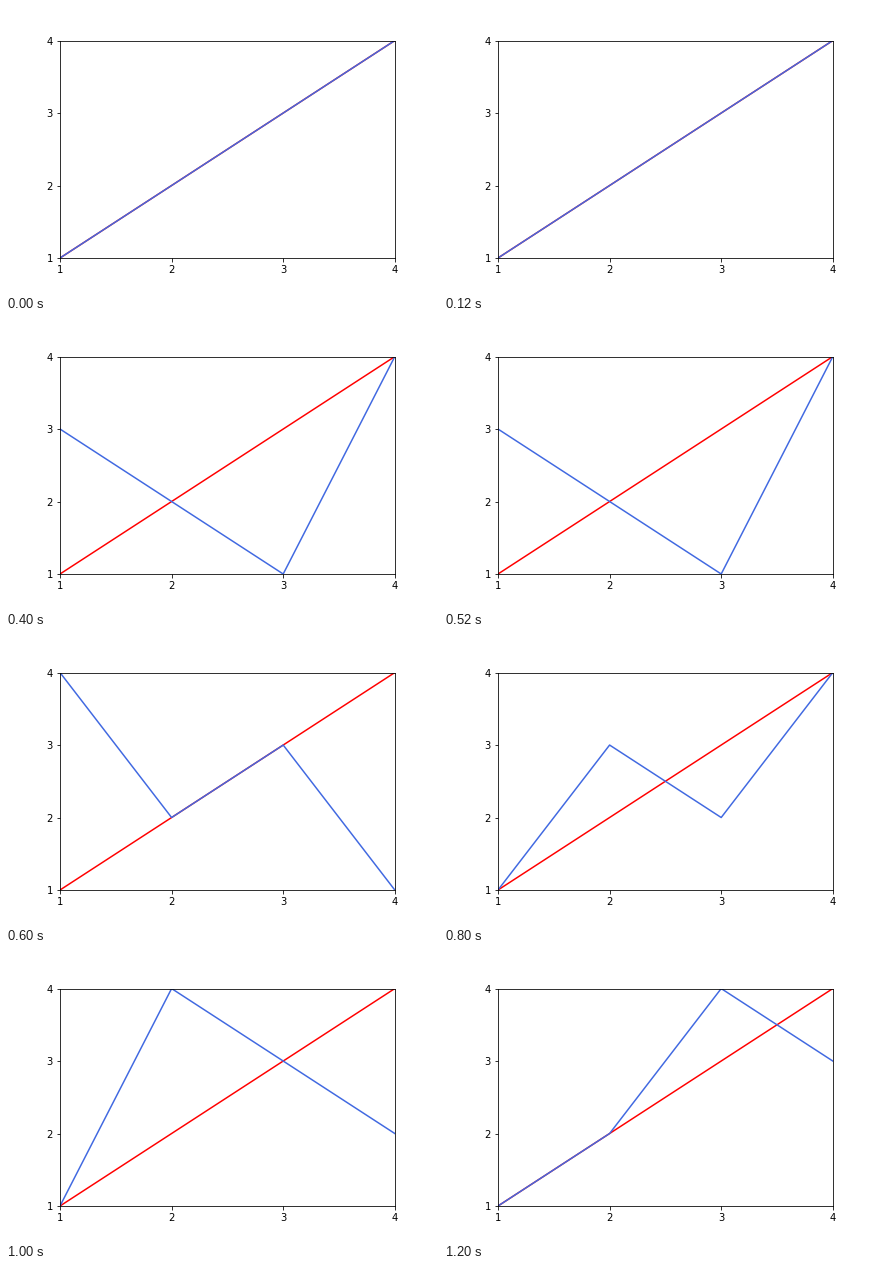
Animation, 432 px wide and 288 px high, one loop 1400 ms. Source, as a matplotlib script:

```python
from itertools import combinations

import matplotlib.pyplot as plt
from matplotlib.animation import FuncAnimation

VALUES = [1, 2, 3, 4]


def swapped(i, j):
    order = VALUES.copy()
    order[i], order[j] = order[j], order[i]
    return order


# The sorted order, followed by every exchange of two elements.
orders = [VALUES] + [swapped(i, j) for i, j in combinations(range(len(VALUES)), 2)]

plt.rcParams["font.family"] = "DejaVu Sans"
fig, ax = plt.subplots(figsize=(6, 4), dpi=72, facecolor="white")
fig.subplots_adjust(left=0.125, right=0.9, bottom=0.125, top=0.88)
ax.set(xlim=(1, 4), ylim=(1, 4), xticks=VALUES, yticks=VALUES)

ax.plot(VALUES, VALUES, color="red", lw=1.5)
line, = ax.plot(VALUES, VALUES, color="royalblue", lw=1.5)


def update(frame):
    line.set_ydata(orders[frame])
    return line,


anim = FuncAnimation(fig, update, frames=len(orders), interval=200,
                     repeat=True, repeat_delay=0)
plt.show()
```
